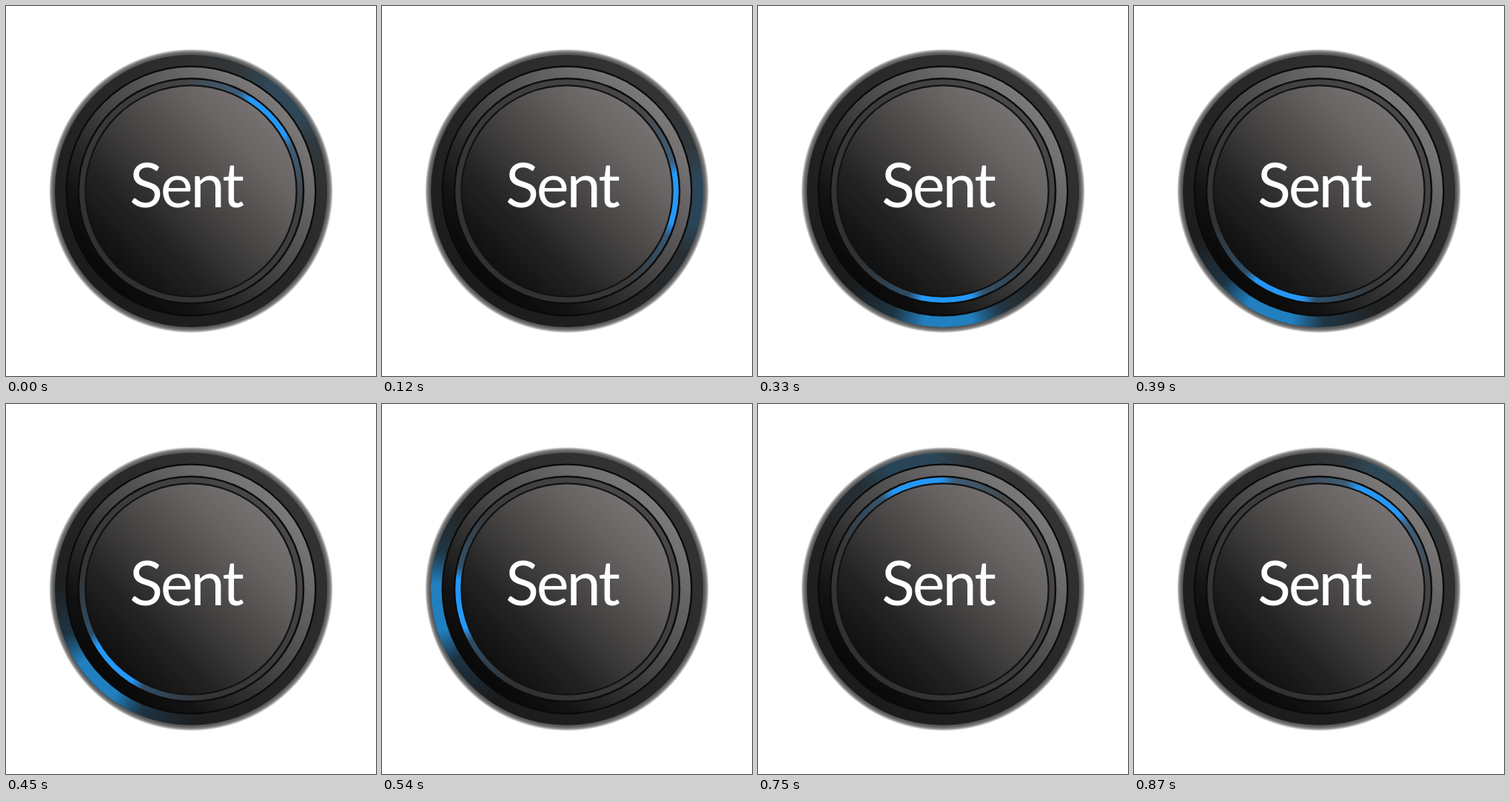
An HTML page with a canvas for the animation above (900 ms loop, 500 by 500 pixels).

```html
<!DOCTYPE html>
<html lang="en">
<head>
<meta charset="utf-8">
<title>Sent button</title>
<style>
  html, body { margin: 0; width: 100%; height: 100%; overflow: hidden; background: #fff; }
  canvas { display: block; }
</style>
</head>
<body>
<canvas id="stage" width="500" height="500"></canvas>
<script>
const ctx = document.getElementById('stage').getContext('2d');
const C = 250, LOOP = 900, STEP = 30;

function addStops(gradient, stops) {
  stops.forEach(([at, color]) => gradient.addColorStop(at, color));
  return gradient;
}

// Gradient from lower left to upper right across a disc of radius r
function diagonal(r, stops) {
  const d = r * Math.SQRT1_2;
  return addStops(ctx.createLinearGradient(C - d, C + d, C + d, C - d), stops);
}

function disc(r, fill) {
  ctx.fillStyle = fill;
  ctx.beginPath();
  ctx.arc(C, C, r, 0, 2 * Math.PI);
  ctx.fill();
}

// Conic light whose middle lies at `angle` degrees clockwise from the top;
// stops are [degrees from the middle, alpha]
function light(angle, rgb, stops) {
  const start = (angle + 90) * Math.PI / 180;
  return addStops(ctx.createConicGradient(start, C, C),
    stops.map(([deg, alpha]) => [(deg + 180) / 360, `rgba(${rgb},${alpha})`]));
}

function draw(angle) {
  ctx.fillStyle = '#fff';
  ctx.fillRect(0, 0, 500, 500);

  // Soft rim and dark outer band
  disc(192, addStops(ctx.createRadialGradient(C, C, 183, C, C, 192), [
    [0, '#4a4a4a'], [0.45, '#6a6a6a'], [0.7, '#949494'], [1, 'rgba(160,160,160,0)']]));
  disc(184, diagonal(184, [[0, '#1b1b1b'], [0.5, '#262626'], [1, '#343434']]));
  disc(184, light(angle, '34,136,205', [
    [-48, 0], [-24, 0.22], [-10, 0.92], [10, 0.92], [24, 0.22], [48, 0]]));
  // The band hides more of the light towards the upper right
  disc(184, diagonal(184, [
    [0.25, 'rgba(34,34,34,0)'], [0.36, 'rgba(35,35,35,0.15)'],
    [0.46, 'rgba(37,37,37,0.5)'], [0.6, 'rgba(40,40,40,0.68)'],
    [1, 'rgba(52,52,52,0.76)']]));

  // Raised ring
  disc(169.5, '#0a0a0a');
  disc(167.2, diagonal(167, [
    [0, '#080808'], [0.16, '#131313'], [0.5, '#444343'], [0.84, '#6a6868'], [1, '#7c7a79']]));

  // Lit groove
  disc(153.3, '#0c0c0c');
  disc(150.8, diagonal(151, [[0, '#303030'], [0.5, '#3a3a3a'], [1, '#484848']]));
  disc(150.8, light(angle, '36,152,248', [
    [-52, 0], [-20, 0.28], [-13, 1], [13, 1], [20, 0.28], [52, 0]]));

  // Face
  disc(143.8, '#121212');
  disc(141.5, diagonal(142, [
    [0, '#101010'], [0.25, '#252424'], [0.5, '#444241'], [0.8, '#656261'], [1, '#757271']]));

  ctx.fillStyle = '#fff';
  ctx.font = '83px Lato, sans-serif';
  ctx.letterSpacing = '-3px';
  ctx.fillText('Sent', 167, 272);
}

function frame(now) {
  const step = Math.floor(now % LOOP / STEP);
  draw(46 + step * STEP / LOOP * 360);
  requestAnimationFrame(frame);
}
requestAnimationFrame(frame);
</script>
</body>
</html>
```
